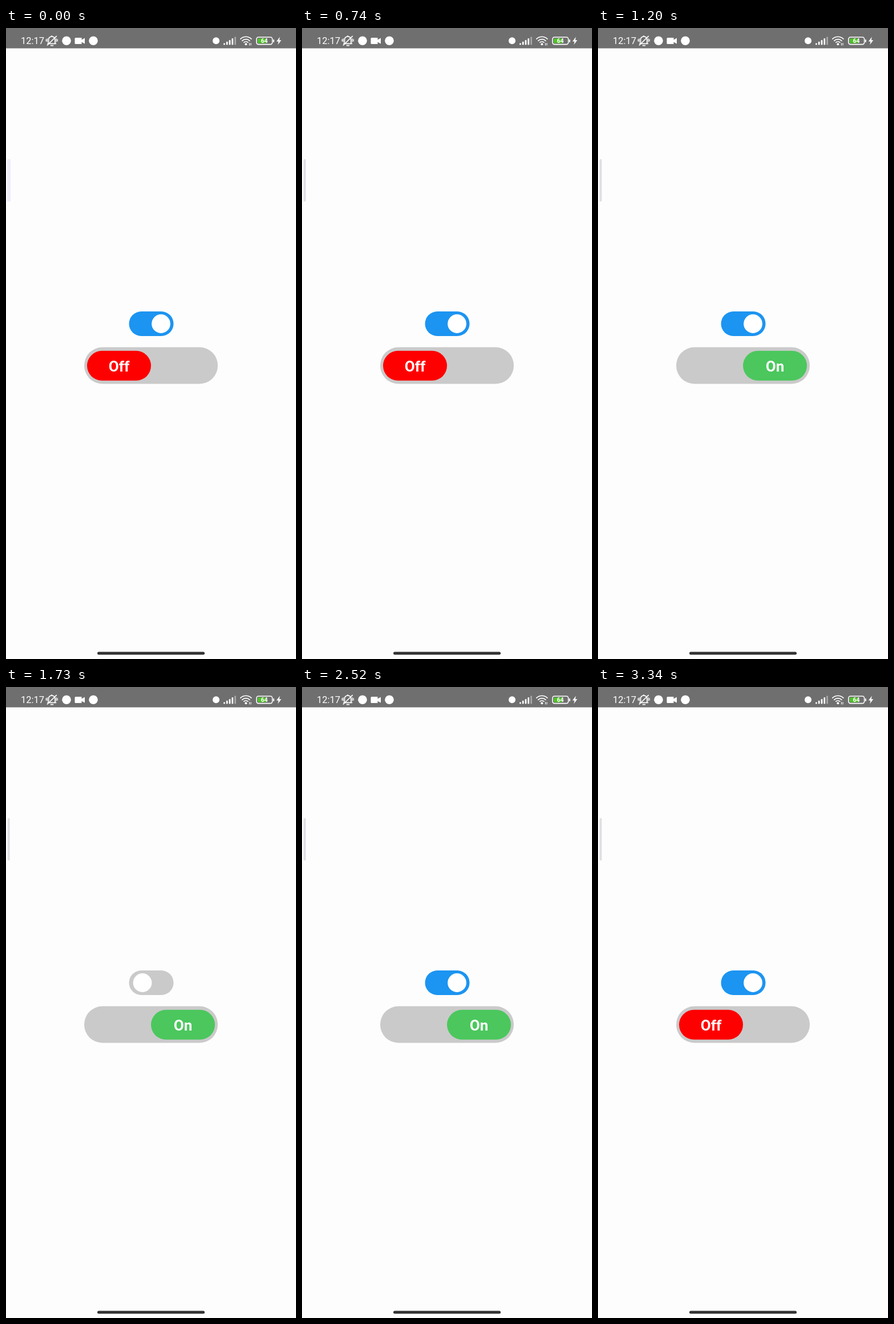
An HTML page that plays this animation: 508x1102 px, repeating every 3590 ms.

```html
<!DOCTYPE html>
<html lang="en">
<head>
<meta charset="utf-8">
<title>Toggle switches</title>
<style>
  html, body { margin: 0; width: 100%; height: 100%; overflow: hidden; background: #fdfdfd; }
  svg { display: block; width: 100vw; height: 100vh; }
  text { font-family: Roboto, "Open Sans", sans-serif; fill: #fff; }
  .line { fill: none; stroke: #fff; stroke-width: 1.7; stroke-linecap: round; stroke-linejoin: round; }
</style>
</head>
<body>
<svg viewBox="0 0 508 1102">
  <rect width="508" height="1102" fill="#fdfdfd"/>
  <rect width="508" height="35.5" fill="#6f6f6f"/>

  <!-- status bar, left -->
  <text x="26" y="28" font-size="16.5">12:17</text>
  <g class="line">
    <path d="M74.5 27V20.5a5.7 5.7 0 0 1 11.4 0V27M73 27.3H87.5M78.5 30.6H82.5M80.2 13.8V14.6"/>
    <path d="M72.4 30L88.3 14.3"/>
    <path d="M72.3 18.6V24M70.3 20V23M88.2 18.6V24M90.2 20V23" stroke-width="1.3"/>
  </g>
  <g fill="#fff">
    <circle cx="106" cy="22.3" r="7.8"/>
    <path d="M122 17H132.5V20.5L138 17.5V27.5L132.5 24.5V28H122Q120.5 28 120.5 26.5V18.5Q120.5 17 122 17Z"/>
    <circle cx="153" cy="22.3" r="7.8"/>

    <!-- status bar, right -->
    <circle cx="368" cy="22.3" r="6"/>
    <g id="bars"></g>
    <circle cx="420.3" cy="28.2" r="2"/>
    <path d="M479.8 15.5L473.8 23.4H477.4L476.2 29.3L482.3 21.2H478.7Z"/>
    <rect x="467.8" y="20" width="2" height="5" rx="1"/>
  </g>
  <g class="line" stroke-width="2">
    <path d="M410.8 19.2a13.4 13.4 0 0 1 19 0M413.8 22.3a9.2 9.2 0 0 1 13 0M416.8 25.2a5 5 0 0 1 7 0"/>
    <path d="M426.5 26.5V30M429 26.5V30" stroke-width="1.1"/>
  </g>
  <rect x="438.8" y="16" width="27.8" height="12.6" rx="3.5" fill="none" stroke="#fff" stroke-width="1.6"/>
  <rect x="441" y="18.2" width="15.5" height="8.2" rx="1.5" fill="#4fc327"/>
  <text x="452.6" y="26.3" font-size="10.5" font-weight="700" text-anchor="middle">64</text>

  <rect id="edge" y="229" height="74" rx="1.5"/>

  <!-- small switch -->
  <rect id="track" x="215.5" y="495" width="78" height="43" rx="21.5"/>
  <circle id="thumb" cy="516.5" r="16.4" fill="#fff"/>

  <!-- labelled switch -->
  <rect x="137" y="557.5" width="234" height="64" rx="32" fill="#cacaca"/>
  <g id="pill">
    <rect id="pillFill" x="142" y="563.8" width="112" height="52" rx="26"/>
    <text id="label" x="198" y="600" font-size="26" font-weight="700" text-anchor="middle"></text>
  </g>

  <rect x="160" y="1089.5" width="188" height="5" rx="2.5" fill="#333"/>
</svg>
<script>
const LOOP = 3590, SLIDE = 300;
const $ = id => document.getElementById(id);
const set = (id, attrs) => {
  for (const name in attrs) $(id).setAttribute(name, attrs[name]);
};

for (let i = 0; i < 5; i++) {
  const h = 3 + i * 2.8;
  $('bars').innerHTML +=
    `<rect x="${381 + i * 4.8}" y="${29.5 - h}" width="2.7" height="${h}" rx="1" opacity="${i < 4 ? 1 : 0.4}"/>`;
}

// Eased progress of a slide beginning at the given time
const slide = (t, start) => {
  const p = Math.min(1, Math.max(0, (t - start) / SLIDE));
  return p < 0.5 ? 2 * p * p : 1 - 2 * (1 - p) ** 2;
};

function draw(t) {
  // Colours and the label flip at once; only the knobs slide.
  const smallOn = t < 1400 || t >= 2180;
  const small = 1 - slide(t, 1400) + slide(t, 2180);
  set('track', { fill: smallOn ? '#1c94f1' : '#cacaca' });
  set('thumb', { cx: 239 + 32.5 * small });

  const bigOn = t >= 813 && t < 2790;
  const big = slide(t, 813) - slide(t, 2790);
  set('pill', { transform: `translate(${112 * big} 0)` });
  set('pillFill', { fill: bigOn ? '#4bc75d' : '#f00' });
  $('label').textContent = bigOn ? 'On' : 'Off';

  const early = t < 300;
  set('edge', { x: early ? 2 : 2.8, width: early ? 6 : 3.8, fill: early ? '#ececf7' : '#dfdfe5' });
}

const begin = performance.now();
function tick() {
  draw((performance.now() - begin) % LOOP);
  requestAnimationFrame(tick);
}
tick();
</script>
</body>
</html>
```
